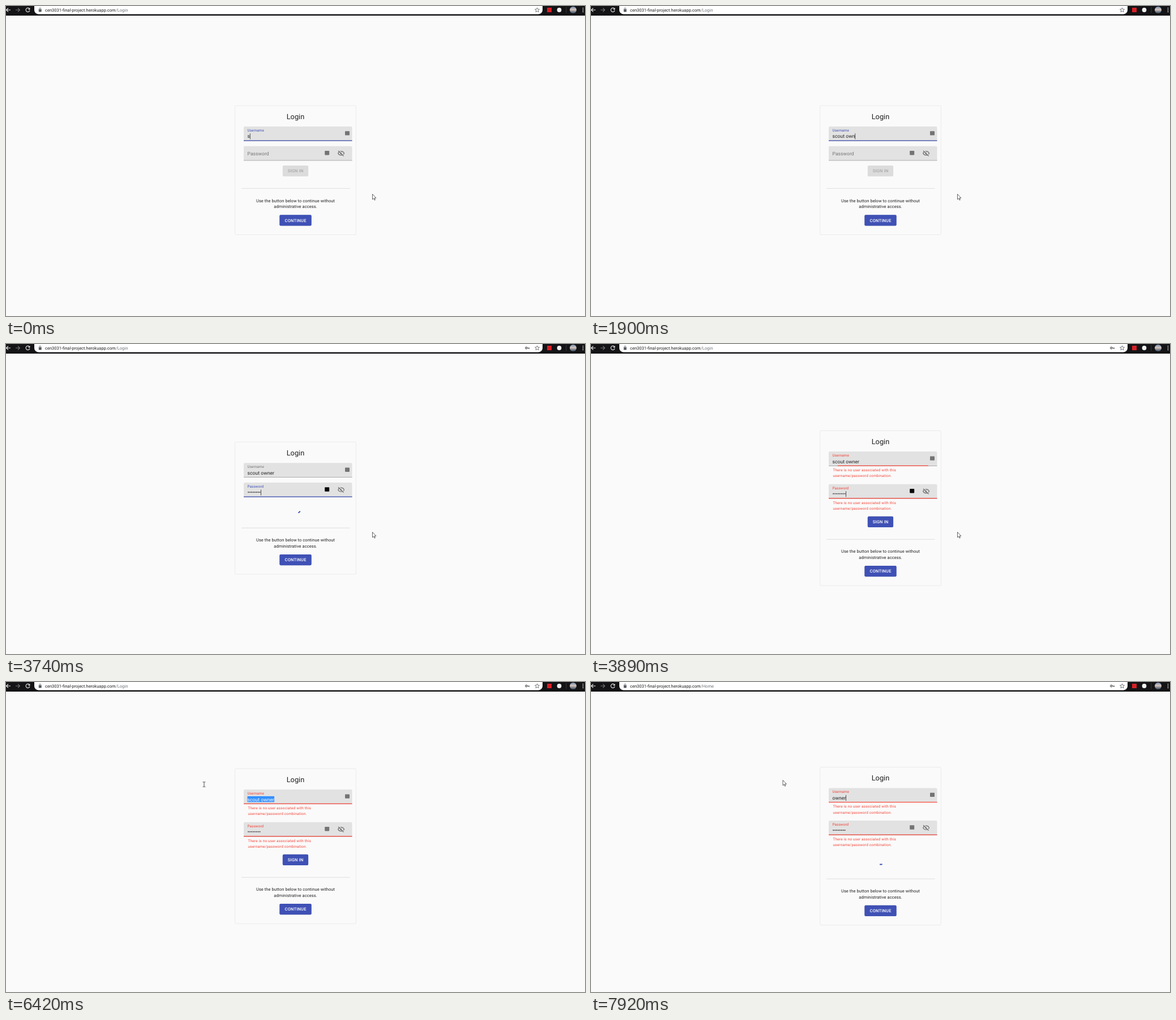
Write an HTML page that moves like this. It is 1023 px wide and 548 px high and loops after 8000 ms.

```html
<!DOCTYPE html>
<html lang="en">
<head>
<meta charset="utf-8">
<title>Login</title>
<style>
  html, body { margin: 0; width: 100%; height: 100%; overflow: hidden; background: #fafafa; }
  svg { display: block; width: 100vw; height: 100vh; font-family: Roboto, sans-serif; text-rendering: geometricPrecision; }
  text { fill: #212121; white-space: pre; }
  .title { font-size: 12.8px; text-anchor: middle; }
  .label { font-size: 6.4px; letter-spacing: .00938em; }
  .input { font-size: 8.53px; letter-spacing: .00938em; }
  .help text { font-size: 6.4px; letter-spacing: .03333em; fill: #f44336; }
  .body { font-size: 7.47px; letter-spacing: .01071em; text-anchor: middle; }
  .button { font-size: 7.47px; font-weight: 500; letter-spacing: .02857em; text-anchor: middle; fill: #fff; }
  .url { font-size: 7.53px; }
  .raised { filter: drop-shadow(0 .8px .6px rgba(0, 0, 0, .22)); }
</style>
</head>
<body>
<svg viewBox="0 0 1023 548">
  <defs>
    <linearGradient id="photo" x2="0" y2="1">
      <stop stop-color="#6f8db0"/><stop offset=".45" stop-color="#d5c4bd"/><stop offset="1" stop-color="#344a63"/>
    </linearGradient>
    <g id="fieldBox">
      <path d="M0 25.6V2.1Q0 0 2.1 0H189.4Q191.5 0 191.5 2.1V25.6Z" fill="#e2e2e2"/>
      <rect y="25" width="191.5" height=".6" fill="#858585"/>
    </g>
    <g id="helper" class="help">
      <text x="7.5" y="35.1">There is no user associated with this</text>
      <text x="7.5" y="45.4">username/password combination.</text>
    </g>
  </defs>

  <rect width="1023" height="548" fill="#fafafa"/>

  <!-- browser bar -->
  <rect width="1023" height="17" fill="#141416"/>
  <path d="M50 0H948V7.2A7.2 7.2 0 0 1 940.8 14.4H57.2A7.2 7.2 0 0 1 50 7.2Z" fill="#fff"/>
  <g fill="none" stroke="#f1f1f1" stroke-width="1.1">
    <path d="M8 7H.8M4 3.6.6 7 4 10.4"/>
    <path d="M17 7h7.2M21 3.6 24.4 7 21 10.4" stroke="#77787a"/>
    <path d="M41.2 4.6A3.5 3.5 0 1 0 41.9 8"/>
  </g>
  <path d="M42.4 3V6.4H39Z" fill="#f1f1f1"/>
  <g stroke="#55585c" fill="none" stroke-width=".8">
    <path d="M58.8 6V4.8a1.4 1.4 0 0 1 2.8 0V6"/>
    <rect x="58.2" y="6.1" width="4" height="3.9" fill="#55585c"/>
  </g>
  <text class="url" x="69" y="9.8">cen3031-final-project.herokuapp.com<tspan id="route" fill="#70757a"></tspan></text>
  <g id="key" fill="none" stroke="#55585c" stroke-width="1.2">
    <circle cx="919.3" cy="7" r="1.6"/><path d="M921 7h4.2M923.8 7v2"/>
  </g>
  <path d="M938.5 3 939.6 5.7 942.5 5.9 940.3 7.8 941 10.7 938.5 9.1 936 10.7 936.7 7.8 934.5 5.9 937.4 5.7Z" fill="none" stroke="#55585c" stroke-width=".8"/>
  <rect x="956" y="3" width="8" height="8" fill="#d81f26"/>
  <circle cx="977.5" cy="7" r="3.9" fill="#f1f1f1"/>
  <path d="M989.8 2V12" stroke="#4a4b4d" stroke-width=".7"/>
  <circle cx="1002" cy="7" r="6" fill="url(#photo)"/>
  <g fill="#f1f1f1"><circle cx="1019.5" cy="3.8" r=".9"/><circle cx="1019.5" cy="7" r=".9"/><circle cx="1019.5" cy="10.2" r=".9"/></g>

  <!-- login card -->
  <rect id="card" x="404.6" width="213.8" rx="2.1" fill="#fafafa" stroke="#e0e0e0" stroke-width=".6"/>
  <text id="title" class="title" x="511.5" y="199.8">Login</text>

  <g id="user">
    <use href="#fieldBox"/>
    <rect id="userBar" y="24.5" height="1.2"/>
    <text id="userLabel" class="label" x="6.5" y="9">Username</text>
    <rect id="selection" x="6.5" y="11.8" height="10.4" fill="#3390ff"/>
    <text id="name" class="input" x="6.5" y="20.6"></text>
    <rect id="userCaret" y="12.4" width=".7" height="10.2" fill="#111"/>
    <rect x="179" y="8.3" width="8" height="7.4" rx=".8" fill="#747474"/>
    <use id="userHelp" href="#helper"/>
  </g>

  <g id="pass">
    <use href="#fieldBox"/>
    <rect id="passBar" y="24.5" height="1.2"/>
    <text id="passLabel" class="label" x="6.5">Password</text>
    <path id="dots" stroke="#212121" stroke-width="1.8" stroke-linecap="round" stroke-dasharray="0 2.9"/>
    <rect id="passCaret" y="12.4" width=".7" height="10.2" fill="#111"/>
    <rect id="passIcon" x="143.2" y="8.3" width="8" height="7.4" rx=".8"/>
    <g transform="translate(165.7 6.2) scale(.533)" fill="none" stroke="#666" stroke-width="2.2">
      <path d="M2 12C5 3.5 19 3.5 22 12 19 20.5 5 20.5 2 12Z"/>
      <circle cx="12" cy="12" r="3.2" fill="#666" stroke="none"/>
      <path d="M4.5 2.3 22 19.8" stroke="#e2e2e2"/>
      <path d="M2.6 3.6 20.4 21.4"/>
    </g>
    <use id="passHelp" href="#helper"/>
  </g>

  <g id="submit">
    <g id="signIn">
      <rect id="signBox" x="488.8" y="282" width="45.3" height="19.3" rx="2.1"/>
      <text id="signText" class="button" x="511.6" y="294.3">SIGN IN</text>
    </g>
    <circle id="spinner" cx="511.6" cy="292.6" r="9.8" fill="none" stroke="#3f51b5" stroke-width="1.8" stroke-dasharray="4.6 100"/>
  </g>

  <g id="bottom">
    <path d="M416 322.5H607.6" stroke="#d9d9d9" stroke-width=".8"/>
    <text class="body" x="511.5" y="346.6">Use the button below to continue without</text>
    <text class="body" x="511.5" y="357.3">administrative access.</text>
    <rect id="contBox" class="raised" x="483.3" y="369.2" width="56.4" height="19.3" rx="2.1"/>
    <text class="button" x="511.6" y="381.5">CONTINUE</text>
  </g>

  <g id="mouse">
    <path id="arrow" d="M0 0V9.3L2.1 7.4 3.5 10.6 4.9 10 3.5 6.8H6.4Z" fill="#fff" stroke="#222" stroke-width=".7"/>
    <path id="beam" d="M-2.4-4.2H-.6L0-3.7.6-4.2H2.4M0-3.7V3.7M-2.4 4.2H-.6L0 3.7.6 4.2H2.4" fill="none" stroke="#222" stroke-width=".8"/>
    <path id="hand" d="M0 0Q1.2-.8 1.4.8V4L5.2 5V8.2L4.2 11H0L-2.8 7V5.4L-.9 6.3V.8Z" fill="#fff" stroke="#222" stroke-width=".7"/>
  </g>
</svg>

<script>
const LOOP = 8000, LIFT = 22.8, SPIN_GROW = 2.7;
const FULL = 'scout owner', SHORT = FULL.slice(6);
const BLUE = '#3f51b5', RED = '#f44336', GREY = '#757575';
const el = Object.fromEntries([...document.querySelectorAll('[id]')].map(e => [e.id, e]));

const start = {
  name: FULL.slice(0, 1), dots: 0, focus: 'user', caret: true, selected: false,
  float: 0, userBar: 1, passBar: 0, error: false, spin: null, route: '/Login', key: false,
  sign: '#dcdcdc', signText: '#a8a8a8', cont: BLUE, mouse: [647.5, 332.6], pointer: 'arrow'
};
const typed = n => ({ name: FULL.slice(0, n), caret: true });
const retyped = n => ({ name: SHORT.slice(0, n), caret: true, selected: false });
const at = (x, y, pointer = 'arrow') => ({ mouse: [x, y], pointer });

const steps = [
  [460, { caret: false }],
  [910, typed(2)], [1050, typed(3)], [1190, typed(4)], [1330, typed(6)], [1470, typed(7)], [1600, typed(8)],
  [1900, typed(9)], [2050, typed(10)], [2190, typed(11)],
  [2330, { focus: 'pass', float: .6, userBar: 0, passBar: .6 }],
  [2470, { float: 1, passBar: 1 }],
  [2610, { dots: 1, key: true, sign: '#7882bd', signText: '#eee' }],
  [2750, { dots: 2, sign: '#4759b6', signText: '#fff' }],
  [2880, { dots: 3, sign: BLUE }],
  [3010, { dots: 4 }], [3160, { dots: 5 }], [3310, { dots: 7 }], [3460, { dots: 8 }],
  [3740, { spin: 52 }],
  [3890, { spin: null, error: true, userBar: .835 }],
  [4040, { userBar: 1, caret: false }],
  [4630, { ...at(622, 352), caret: true }], [4780, at(570, 380)],
  [4930, { ...at(528, 394, 'hand'), cont: '#3646a8' }],
  [5090, { ...at(508, 396, 'hand'), cont: '#303f9f', caret: false }],
  [5390, { ...at(505, 379, 'beam'), cont: '#323f9c', sign: '#3b4cab' }],
  [5530, { ...at(506, 340), cont: BLUE, sign: BLUE }],
  [5670, at(508, 296)], [5820, at(500, 242)], [5970, at(482, 209, 'beam')],
  [6120, { ...at(478, 207, 'beam'), focus: 'user', caret: true }],
  [6270, { ...at(400, 190, 'beam'), selected: true, caret: false }],
  [6420, at(350, 181, 'beam')],
  [6570, at(339, 173.6)],
  [6890, retyped(1)], [7040, retyped(2)], [7180, retyped(3)], [7320, retyped(4)], [7470, retyped(5)],
  [7770, { spin: 52 }],
  [7920, { spin: 90, route: '/Home' }]
];

const set = (id, attrs) => { for (const k in attrs) el[id].setAttribute(k, attrs[k]); };
const move = (id, x, y) => set(id, { transform: `translate(${x} ${y})` });
const show = (id, on) => set(id, { visibility: on ? 'visible' : 'hidden' });
const bar = (id, scale, fill) => set(id, { x: 95.75 * (1 - scale), width: 191.5 * scale, fill });

function draw(s) {
  const err = s.error ? LIFT : 0, grow = s.spin === null ? 0 : SPIN_GROW, shift = err + grow;
  set('card', { y: 176 - shift, height: 228.3 + 2 * shift });
  move('title', 0, -shift);
  move('user', 420, 212.9 - shift);
  move('pass', 420, 247.7 - grow);
  move('submit', 0, err - grow);
  move('bottom', 0, shift);

  const tint = id => s.error ? RED : s.focus === id ? BLUE : GREY;
  const accent = s.error ? RED : BLUE;
  bar('userBar', s.userBar, accent);
  bar('passBar', s.passBar, accent);
  set('userLabel', { fill: tint('user'), style: `fill:${tint('user')}` });
  set('passLabel', {
    y: 15.9 - 6.9 * s.float,
    style: `fill:${tint('pass')};font-size:${8.53 - 2.13 * s.float}px`
  });
  show('userHelp', s.error);
  show('passHelp', s.error);

  el.name.textContent = s.name;
  el.name.style.fill = s.selected ? '#fff' : '';
  const width = el.name.getComputedTextLength();
  set('selection', { width });
  show('selection', s.selected);
  set('userCaret', { x: 6.4 + width });
  show('userCaret', s.caret && s.focus === 'user');
  set('dots', { d: `M8.2 17H${8.3 + 2.9 * (s.dots - 1)}` });
  show('dots', s.dots > 0);
  set('passCaret', { x: 6.9 + 2.9 * s.dots });
  show('passCaret', s.caret && s.focus === 'pass');
  set('passIcon', { fill: s.focus === 'pass' ? '#080808' : '#747474' });

  show('signIn', s.spin === null);
  set('signBox', { fill: s.sign, class: s.dots ? 'raised' : '' });
  el.signText.style.fill = s.signText;
  show('spinner', s.spin !== null);
  set('spinner', { transform: `rotate(${(s.spin || 0) - 18} 511.6 292.6)` });
  set('contBox', { fill: s.cont });

  el.route.textContent = s.route;
  show('key', s.key);
  move('mouse', ...s.mouse);
  for (const p of ['arrow', 'beam', 'hand']) show(p, p === s.pointer);
}

const origin = performance.now();
let shown = -1;
function frame() {
  const t = (performance.now() - origin) % LOOP;
  const past = steps.filter(([time]) => time <= t);
  if (past.length !== shown) {
    shown = past.length;
    draw(Object.assign({}, start, ...past.map(([, change]) => change)));
  }
  requestAnimationFrame(frame);
}
frame();
</script>
</body>
</html>
```
